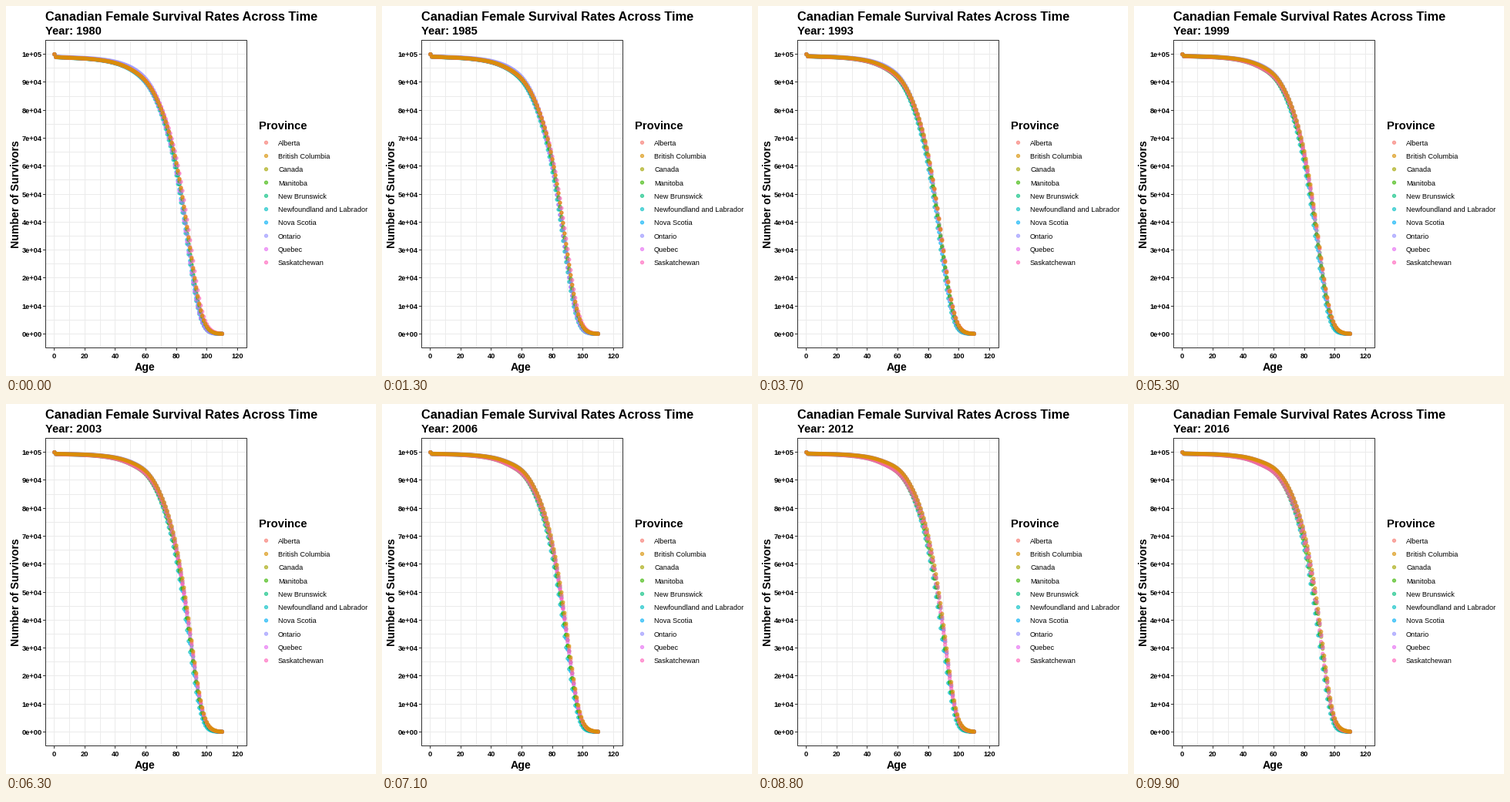
Recreate the animation shown at these times as a matplotlib script. Size 480 by 480 pixels, loop 10 s.

```python
import numpy as np
import matplotlib.pyplot as plt
from matplotlib.animation import FuncAnimation

SIZE, DPI = 480, 80
PX = 72 / DPI  # points per pixel
FRAMES, INTERVAL = 100, 100
FIRST, LAST = 1980, 2016
LEFT, RIGHT, TOP, BOTTOM = 51, 312, 44.5, 443.5
GRID, DARK, ALPHA = "#EBEBEB", "#333333", 0.6

COLORS = {
    "Alberta": "#F8766D",
    "British Columbia": "#D89000",
    "Canada": "#A3A500",
    "Manitoba": "#39B600",
    "New Brunswick": "#00BF7D",
    "Newfoundland and Labrador": "#00BFC4",
    "Nova Scotia": "#00B0F6",
    "Ontario": "#9590FF",
    "Quebec": "#E76BF3",
    "Saskatchewan": "#FF62BC",
}

# Log-hazard offsets in drawing order: young first/last year, old first/last year
OFFSETS = {
    "Canada": (0.02, 0.05, 0.06, 0.05),
    "Newfoundland and Labrador": (0.06, 0.20, 0.17, 0.26),
    "Nova Scotia": (0.02, 0.14, 0.13, 0.15),
    "New Brunswick": (0.00, 0.10, 0.07, 0.12),
    "Quebec": (0.02, 0.00, 0.15, 0.04),
    "Ontario": (-0.16, 0.02, 0.09, 0.03),
    "Manitoba": (0.03, 0.30, 0.02, 0.14),
    "Saskatchewan": (0.00, 0.32, -0.08, 0.10),
    "Alberta": (0.02, 0.12, -0.01, 0.03),
    "British Columbia": (0, 0, 0, 0),
}

# Share of survivors at a few ages in the first and last year
KNOTS = np.array([1, 10, 20, 40, 50, 60, 70, 80, 90, 96, 100, 110])
SHARE_FIRST = [.990, .9877, .985, .969, .947, .904, .805, .611, .270, .084, .026, .0003]
SHARE_LAST = [.9957, .9948, .9935, .9842, .970, .944, .872, .713, .400, .155, .049, .001]

# Progress between both years, for young and old ages
YEARS = [1980, 1985, 1993, 1999, 2003, 2009, 2016]
YOUNG_PROGRESS = [0, .20, .45, .60, .73, .88, 1]
OLD_PROGRESS = [0, .11, .20, .31, .45, .76, 1]

AGES = np.arange(111)


def log_hazard(share):
    """Cubic Hermite curve of log cumulative hazard for ages 1 and up."""
    y = np.log(-np.log(share))
    slope = np.gradient(y, KNOTS)
    age = AGES[1:]
    i = np.clip(np.searchsorted(KNOTS, age, side="right") - 1, 0, len(KNOTS) - 2)
    h = KNOTS[i + 1] - KNOTS[i]
    u = (age - KNOTS[i]) / h
    return (y[i] * (1 + 2 * u) * (1 - u) ** 2 + y[i + 1] * u**2 * (3 - 2 * u)
            + h * (slope[i] * u * (1 - u) ** 2 + slope[i + 1] * u**2 * (u - 1)))


H_FIRST, H_LAST = log_hazard(SHARE_FIRST), log_hazard(SHARE_LAST)
OLDNESS = np.clip((AGES[1:] - 50) / 40, 0, 1)


def survivors(name, year):
    young = np.interp(year, YEARS, YOUNG_PROGRESS)
    old = np.interp(year, YEARS, OLD_PROGRESS)
    p = young + (old - young) * OLDNESS
    t = (year - FIRST) / (LAST - FIRST)
    y0, y1, o0, o1 = OFFSETS[name]
    offset = (y0 + (y1 - y0) * t) * (1 - OLDNESS) + (o0 + (o1 - o0) * t) * OLDNESS
    hazard = np.exp(H_FIRST + (H_LAST - H_FIRST) * p + offset)
    return np.concatenate([[1e5], 1e5 * np.exp(-hazard)])


def to_x(age):
    return LEFT + (np.asarray(age) + 6) / 132 * (RIGHT - LEFT)


def to_y(count):
    return BOTTOM - (np.asarray(count) + 5000) / 110000 * (BOTTOM - TOP)


def snap(v):
    """Centre of the pixel that holds v."""
    return np.floor(v) + 0.5


plt.rcParams["font.family"] = "Liberation Sans"
fig = plt.figure(figsize=(SIZE / DPI, SIZE / DPI), dpi=DPI, facecolor="white")
ax = fig.add_axes([0, 0, 1, 1])
ax.set(xlim=(0, SIZE), ylim=(SIZE, 0))
ax.axis("off")


def line(xs, ys, color, z):
    ax.plot(xs, ys, color=color, lw=PX, zorder=z, snap=False,
            solid_capstyle="butt", solid_joinstyle="miter")


def label(x, y, text, size, bold=True, **kw):
    return ax.text(x, y, text, fontsize=size * PX, va="baseline", color="black",
                   weight="bold" if bold else "normal", **kw)


def dots(x, y, colors):
    return ax.scatter(x, y, s=(4.2 * PX) ** 2, c=colors, alpha=ALPHA,
                      linewidths=1.1 * PX, zorder=3)


# Grid, ticks and panel border
x0, x1, y0, y1 = snap(LEFT), snap(RIGHT), snap(TOP), snap(BOTTOM)
for age in range(0, 121, 10):
    x = snap(to_x(age))
    line([x, x], [y0, y1], GRID, 1)
    if age % 20 == 0:
        line([x, x], [y1, y1 + 3.5], DARK, 2)
        label(to_x(age) - 0.2, 456.8, str(age), 9.3, ha="center")
for k in range(0, 21):
    y = snap(to_y(k * 5000))
    line([x0, x1], [y, y], GRID, 1)
    if k % 2 == 0:
        line([x0 - 3.5, x0], [y, y], DARK, 2)
        label(46.5, y + 3.5, f"{k * 5000:.0e}", 9.3, ha="right")
line([x0, x1, x1, x0, x0], [y0, y0, y1, y1, y0], DARK, 4)

# Titles
label(51, 19, "Canadian Female Survival Rates Across Time", 16.4)
year_text = label(51, 37, "", 14.7)
label(180.5, 473, "Age", 14.2, ha="center")
label(17.5, 244, "Number of Survivors", 14.15, ha="center", rotation=90,
      rotation_mode="anchor")

# Legend
label(328, 160, "Province", 14.8)
rows = 177.2 + 17.28 * np.arange(len(COLORS))
dots(np.full(len(COLORS), 337.5), rows, list(COLORS.values()))
for y, name in zip(rows, COLORS):
    label(353, y + 3.5, name, 9.2, bold=False)

xs = np.tile(to_x(AGES), len(OFFSETS))
cloud = dots(xs, xs, np.repeat([COLORS[n] for n in OFFSETS], len(AGES)))


def update(i):
    year = FIRST + (LAST - FIRST) * i / (FRAMES - 1)
    ys = np.concatenate([to_y(survivors(n, year)) for n in OFFSETS])
    cloud.set_offsets(np.column_stack([xs, ys]))
    year_text.set_text(f"Year: {round(year)}")
    return cloud, year_text


anim = FuncAnimation(fig, update, frames=FRAMES, interval=INTERVAL,
                     repeat=True, repeat_delay=0)
plt.show()
```
